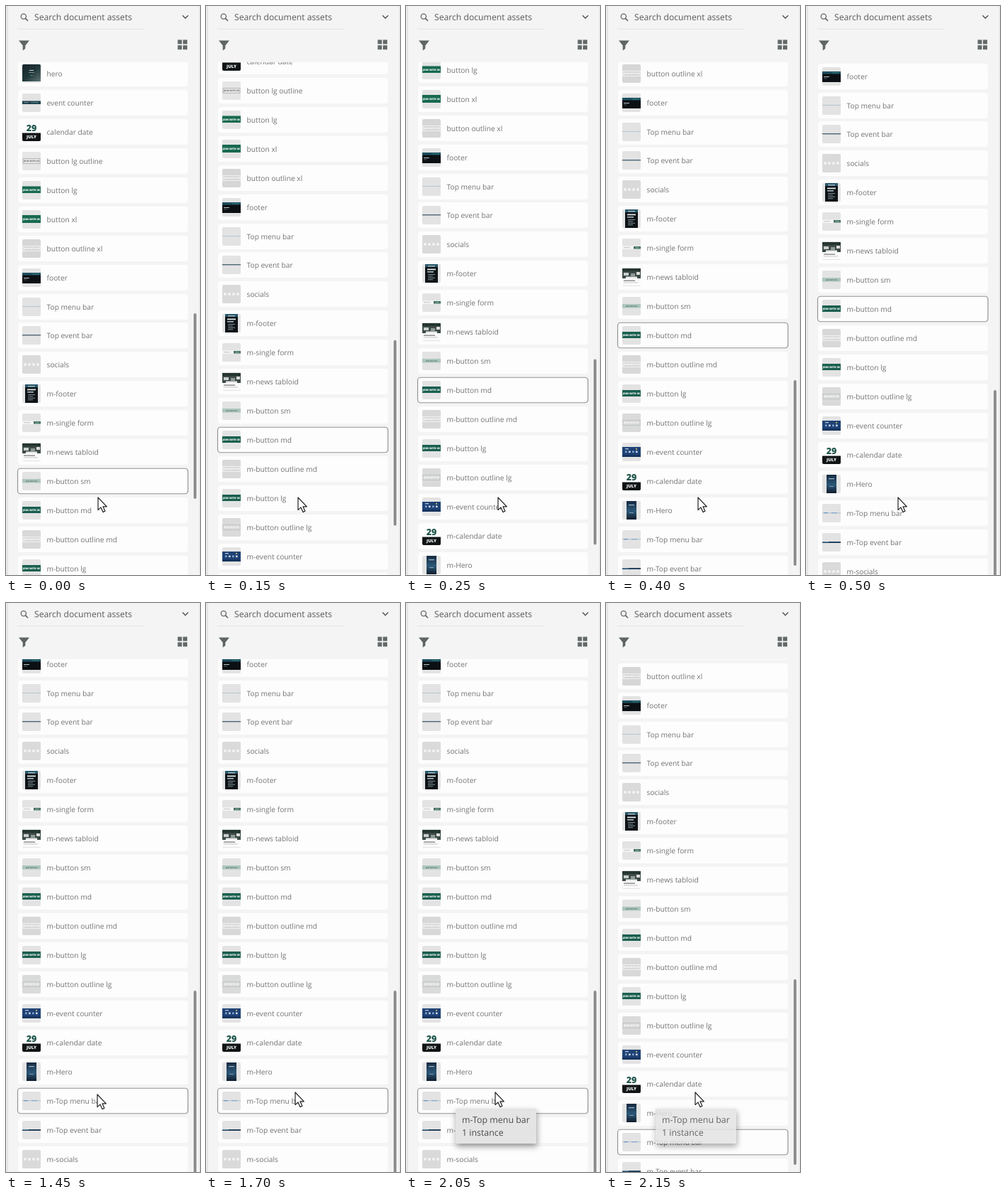
Animation of 274x800 px, one loop 2.2 s. Source, as an HTML page:

```html
<!DOCTYPE html>
<html lang="en">
<head>
<meta charset="utf-8">
<title>Document assets</title>
<style>
  html, body { margin: 0; width: 100%; height: 100%; overflow: hidden; background: #f4f4f4; }
  svg { display: block; }
  text { font-family: "Open Sans", "Noto Sans", sans-serif; text-rendering: geometricPrecision; }
  .label { font-size: 10.24px; fill: #747474; }
  .tiny { font-weight: 800; text-anchor: middle; }
</style>
</head>
<body>
<svg id="stage" width="274" height="800" viewBox="0 0 274 800">
  <defs>
    <clipPath id="listClip"><rect x="0" y="79" width="274" height="721"/></clipPath>
    <clipPath id="thumbClip"><rect width="26" height="26" rx="2"/></clipPath>
    <linearGradient id="sky" x1="0" y1="0" x2="0" y2="1">
      <stop offset="0" stop-color="#162a40"/>
      <stop offset=".55" stop-color="#2c5878"/>
      <stop offset="1" stop-color="#101d2c"/>
    </linearGradient>
    <linearGradient id="night" x1="0" y1="0" x2="1" y2="1">
      <stop offset="0" stop-color="#17262c"/>
      <stop offset=".5" stop-color="#203539"/>
      <stop offset="1" stop-color="#5d7573"/>
    </linearGradient>
    <filter id="shade" x="-20%" y="-40%" width="140%" height="190%">
      <feDropShadow dx="1" dy="4" stdDeviation="4.5" flood-color="#000" flood-opacity=".4"/>
    </filter>
  </defs>

  <rect width="274" height="800" fill="#f4f4f4"/>
  <rect width="2" height="800" fill="#ebebeb"/>
  <rect x="2" width="1" height="800" fill="#dedede"/>
  <rect x="272" width="2" height="800" fill="#ececec"/>

  <g clip-path="url(#listClip)">
    <g id="list"></g>
  </g>

  <g fill="none" stroke="#666" stroke-width="1.3">
    <circle cx="24.8" cy="14.8" r="3.6"/>
    <path d="M27.4 17.4L31 21" stroke-width="1.7"/>
    <path d="M249.3 13.2L253.3 17.2L257.3 13.2" stroke="#555" stroke-width="1.5"/>
  </g>
  <text x="40" y="20" font-size="12.2" fill="#5a5a5a">Search document assets</text>
  <rect x="16" y="32" width="180" height="1" fill="#e4e4e4"/>
  <path d="M18 48.5H33L27.3 55.5V60L23.7 62.5V55.5Z" fill="#5f6565"/>
  <path d="M242.5 47.5h6v6h-6zM250 47.5h6v6h-6zM242.5 55.3h6v6h-6zM250 55.3h6v6h-6z" fill="#646a6a"/>

  <rect id="thumb" x="265" width="4" height="261" rx="2" fill="#8f8f8f"/>

  <g id="tip">
    <rect x="70" y="711" width="114" height="49" fill="#e4e4e4" filter="url(#shade)"/>
    <text x="79" y="731" font-size="12.4" fill="#4a4a4a">m-Top menu bar</text>
    <text x="79" y="748.5" font-size="12.4" fill="#4a4a4a">1 instance</text>
  </g>

  <path id="cursor" d="M0 0V17.6L4 13.9L7 20.6L9.9 19.3L7 12.8H12.4Z" fill="#fff" stroke="#222" stroke-width="1.2" stroke-linejoin="round"/>
</svg>

<script>
const NS = "http://www.w3.org/2000/svg";
const $ = id => document.getElementById(id);
const STEP = 40.94, FIRST = 95, LOOP = 2200, TICK = 50;
const rowY = i => Math.round(FIRST + i * STEP);

function add(parent, tag, attrs, text) {
  const el = document.createElementNS(NS, tag);
  for (const k in attrs) el.setAttribute(k, attrs[k]);
  if (text) el.textContent = text;
  parent.appendChild(el);
  return el;
}

const box = (g, x, y, width, height, fill, more) => add(g, "rect", { x, y, width, height, fill, ...more });
const tiny = (g, y, size, fill, text) =>
  add(g, "text", { x: 13, y, fill, class: "tiny", "font-size": size }, text);

// Thumbnail painters, each in a 26 x 26 box
const line = (y, h, color) => g => box(g, 0, y, 26, h, color);

const button = (y, h, color, ink = "#fff", size = 3.5) => g => {
  box(g, 0, y, 26, h, color);
  tiny(g, y + h / 2 + size * 0.37, size, ink, "JOIN WITH US");
};

const outline = (edge, ink) => g => {
  box(g, 1, 9.5, 24, 7, "none", { stroke: edge, "stroke-width": 0.9 });
  tiny(g, 14.2, 3.2, ink, "JOIN WITH US");
};

function hero(g) {
  box(g, 0, 0, 26, 24, "url(#night)");
  box(g, 10, 8, 6, 1, "#c5d0d2");
  box(g, 9, 11, 8, 0.8, "#8fa3a8");
  box(g, 11, 15, 4, 1, "#2f8d74");
}

function counter(g) {
  box(g, 0, 10.5, 26, 4.5, "#1f3d4c");
  box(g, 2, 12.2, 7, 1, "#75909b");
  box(g, 12, 12.2, 11, 1, "#4e8f88");
}

function calendar(g) {
  box(g, 0, 0, 26, 26, "#fff");
  tiny(g, 12, 12.5, "#24594f", "29");
  box(g, 0, 14.5, 26, 11.5, "#101414");
  tiny(g, 22.4, 6, "#fff", "JULY");
}

function footer(g) {
  box(g, 0, 6, 26, 15, "#0b1014");
  box(g, 0, 6, 26, 3.5, "#1d4f60");
  box(g, 14, 7, 10, 1.5, "#2c6f72");
  box(g, 2, 13, 8, 1, "#b9c2c6");
  box(g, 2, 15.5, 5, 0.7, "#66727a");
}

function socials(g) {
  for (let i = 0; i < 4; i++)
    add(g, "circle", { cx: 4 + i * 6, cy: 13, r: 1.9, fill: "#f5f5f5" });
}

function tallFooter(g) {
  box(g, 4, 0, 18, 26, "#0d1317");
  box(g, 4, 0, 18, 4, "#28566a");
  box(g, 8, 2, 10, 1.5, "#9db6bd");
  box(g, 7, 6.5, 12, 1.8, "#dfe6e8");
  box(g, 7, 10, 9, 1.6, "#aebcc0");
  for (let i = 0; i < 4; i++) box(g, 8, 14 + i * 2.4, 10 - i % 2 * 3, 1, "#7f8f95");
}

function form(g) {
  box(g, 0, 10.5, 26, 4.5, "#f6f6f6");
  box(g, 16, 11, 10, 3.5, "#3f6c5f");
  box(g, 18, 12.4, 6, 0.8, "#a9c0b8");
  box(g, 2, 12.4, 9, 0.8, "#b5b5b5");
}

function news(g) {
  box(g, 0, 1, 26, 24, "#fafafa");
  box(g, 0, 1, 26, 14, "#3d4a48");
  box(g, 0, 1, 26, 4, "#24362f");
  box(g, 2, 7, 7, 4, "#c9cfcc");
  box(g, 12, 8, 6, 4, "#8c9995");
  box(g, 20, 6, 5, 4, "#dcdcd8");
  box(g, 5, 12.5, 16, 2.5, "#e9ebea");
  box(g, 2, 17.5, 16, 1.2, "#777");
  box(g, 2, 20.5, 20, 0.8, "#bbb");
}

function blueCounter(g) {
  box(g, 0, 6, 26, 14, "#1f4275");
  box(g, 0, 17, 26, 3, "#17345f");
  for (let i = 0; i < 4; i++) box(g, 4 + i * 5, 11.5, 2.6, 2.6, i % 2 ? "#c9d6e8" : "#7fa3cf");
  box(g, 4, 8.2, 5, 1, "#dfe7f2");
  box(g, 19, 8, 2, 1.5, "#d8c65a");
}

function tallHero(g) {
  box(g, 6, 0, 14, 26, "url(#sky)");
  box(g, 9, 5, 8, 1.2, "#9fb6c8");
  box(g, 10, 16, 6, 1, "#7f9fb5");
}

function menu(g) {
  box(g, 0, 12.3, 26, 1, "#a9c0d4");
  box(g, 2, 12, 6, 1.2, "#6f95bd");
  box(g, 13, 12, 8, 1.2, "#86a6c8");
}

function eventBar(g) {
  box(g, 0, 12, 26, 2, "#24435e");
  box(g, 0, 12, 9, 1, "#5f8fae");
}

const GREEN = "#17694f", DEEP = "#1a5f50";
const items = [
  ["hero", hero],
  ["event counter", counter],
  ["calendar date", calendar],
  ["button lg outline", outline("#b4b4b4", "#777"), "#e6e6e6"],
  ["button lg", button(7.5, 9.5, GREEN)],
  ["button xl", button(7, 11, GREEN)],
  ["button outline xl", outline("#f4f4f4", "#fff"), "#d6d6d6"],
  ["footer", footer],
  ["Top menu bar", line(12, 1, "#b4c5ce")],
  ["Top event bar", line(12, 1.4, "#4d6676")],
  ["socials", socials, "#dadada"],
  ["m-footer", tallFooter],
  ["m-single form", form],
  ["m-news tabloid", news],
  ["m-button sm", button(10, 5.5, "#adc6bd", "#566f65", 2.4)],
  ["m-button md", button(8, 9, DEEP)],
  ["m-button outline md", outline("#f4f4f4", "#fff"), "#d8d8d8"],
  ["m-button lg", button(8, 9, DEEP)],
  ["m-button outline lg", outline("#bcc4c2", "#f8f8f8"), "#dadada"],
  ["m-event counter", blueCounter],
  ["m-calendar date", calendar],
  ["m-Hero", tallHero],
  ["m-Top menu bar", menu],
  ["m-Top event bar", eventBar],
  ["m-socials", socials, "#dadada"]
];

items.forEach(([name, paint, back = "#e3e3e3"], i) => {
  const row = add($("list"), "g", { transform: `translate(0 ${rowY(i)})` });
  box(row, 17, -18, 240, 36, "#fdfdfd", { rx: 4 });
  const pic = add(row, "g", { transform: "translate(23 -13)", "clip-path": "url(#thumbClip)" });
  box(pic, 0, 0, 26, 26, back);
  paint(pic);
  add(row, "text", { x: 57.5, y: 3.8, class: "label" }, name);
});
const ring = box($("list"), 16.5, 0, 240.5, 35.5, "none", { rx: 4, stroke: "#949494", "stroke-width": 1.2 });

// Tracks of [time, value]
const scroll = [[0, 0], [50, 26], [100, 62], [200, 136], [250, 169], [350, 224], [450, 268],
  [500, 282.6], [600, 293], [700, 295.6], [2050, 295.6], [2100, 281], [2150, 238]];
const barLead = [[2100, 0], [2150, 6]];
const cursorX = [[1400, 130], [1450, 129], [1600, 126]];
const cursorY = [[1450, 691], [1600, 688]];
const tipAlpha = [[1700, 0], [1800, 1], [2100, 1], [2150, 0.85]];

function at(track, t) {
  const n = track.findIndex(p => p[0] > t);
  if (n === 0) return track[0][1];
  if (n < 0) return track[track.length - 1][1];
  const [t0, a] = track[n - 1], [t1, b] = track[n];
  return a + (b - a) * (t - t0) / (t1 - t0);
}

const hovered = t => t < 50 ? 14 : t < 700 ? 15 : 22;

function draw(t) {
  const s = at(scroll, t);
  $("list").setAttribute("transform", `translate(0 ${-Math.round(s)})`);
  ring.setAttribute("y", rowY(hovered(t)) - 17.75);
  $("thumb").setAttribute("y", 432 + s * 0.382 + at(barLead, t));
  $("cursor").setAttribute("transform", `translate(${at(cursorX, t)} ${at(cursorY, t)})`);
  $("tip").setAttribute("opacity", at(tipAlpha, t));
}

const start = performance.now();
function frame() {
  const t = (performance.now() - start) % LOOP;
  draw(Math.floor(t / TICK) * TICK);
  requestAnimationFrame(frame);
}
frame();
</script>
</body>
</html>
```
